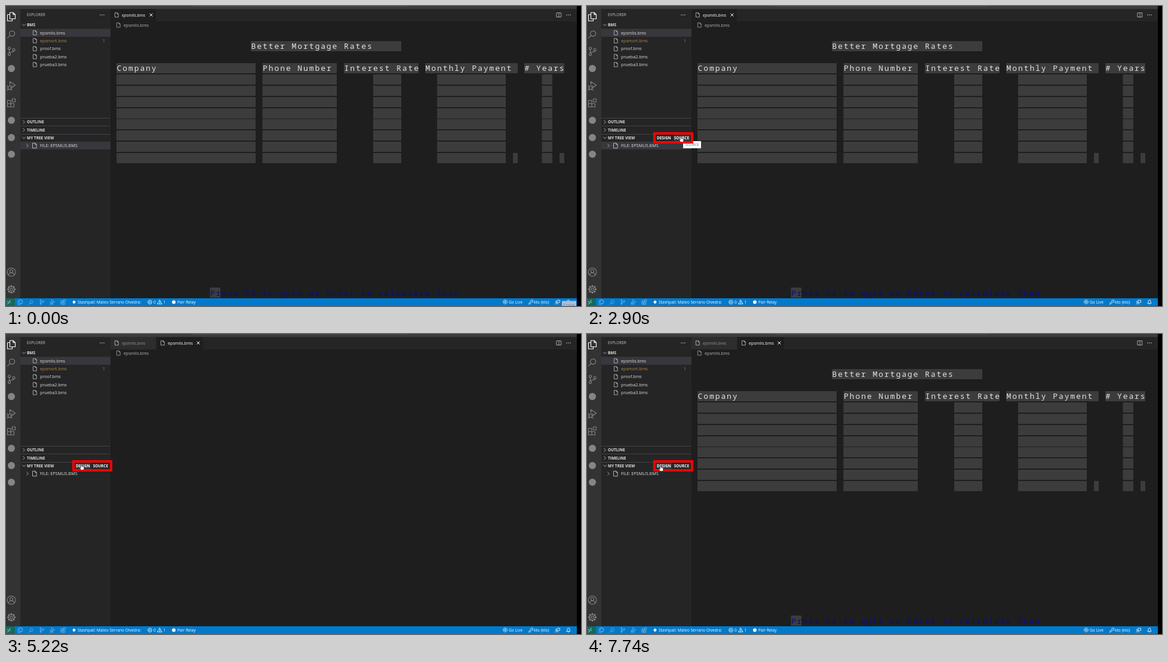
Write an HTML page that moves like this. It is 963 by 504 pixels and loops after 8000 ms.

```html
<!DOCTYPE html>
<html lang="en">
<head>
<meta charset="utf-8">
<title>Map preview</title>
<style>
html, body { margin: 0; width: 100%; height: 100%; overflow: hidden; background: #000; }
svg { display: block; width: 100vw; height: 100vh; }
text { font-family: "Open Sans", "Noto Sans", sans-serif; white-space: pre; }
.mono { font-family: "Noto Sans Mono", monospace; font-size: 13px; letter-spacing: 1.92px; }
.line { fill: none; stroke-linejoin: round; stroke-linecap: round; }
</style>
</head>
<body>
<svg id="stage" viewBox="0 0 963 504" preserveAspectRatio="none"></svg>
<script>
const LOOP = 8000;
const stage = document.getElementById("stage");

function add(parent, tag, attrs, content) {
  const node = document.createElementNS("http://www.w3.org/2000/svg", tag);
  for (const key in attrs) node.setAttribute(key, attrs[key]);
  if (content) node.textContent = content;
  parent.appendChild(node);
  return node;
}
const group = (parent = stage) => add(parent, "g", {});
const rect = (g, x, y, width, height, fill, extra) => add(g, "rect", { x, y, width, height, fill, ...extra });
const dot = (g, cx, cy, r, fill) => add(g, "circle", { cx, cy, r, fill });
const label = (g, x, mid, content, fill = "#dedede", size = 7.2, extra) =>
  add(g, "text", { x, y: mid + size * 0.36, fill, "font-size": size, ...extra }, content);
const mono = (g, x, y, content, fill = "#e4e4e4") => add(g, "text", { x, y, fill, class: "mono" }, content);
const icon = (g, x, y, d, stroke = "#c5c5c5", width = 0.8, scale = 1) =>
  add(g, "path", { d, stroke, class: "line", "stroke-width": width / scale, transform: `translate(${x} ${y}) scale(${scale})` });
const show = (node, on) => node.setAttribute("visibility", on ? "visible" : "hidden");
const BOLD = { "font-weight": 700 };
const ITALIC = { "font-style": "italic" };

// Icon outlines are centred on 0,0.
const FILE = "M-2.7-3.7h3.4l2 2v5.4h-5.4zM.7-3.7v2h2";
const CROSS = "M-2.2-2.2l4.4 4.4M2.2-2.2l-4.4 4.4";
const DOWN = "M-2.6-1.3l2.6 2.6 2.6-2.6";
const RIGHT = "M-1.3-2.6l2.6 2.6-2.6 2.6";
const FILES = "M-2.5-7h5.5l3.5 3.5v7h-9zM-2.5-3.5h-4v10.5h8v-3.5M3-7v3.5h3.5";
const SEARCH = "M-2.5 2a4.5 4.5 0 1 1 1 1zM-2.2 2.2L-6.5 7";
const BRANCH = "M-5.5-5a2 2 0 1 0 4 0a2 2 0 1 0-4 0M-5.5 5a2 2 0 1 0 4 0a2 2 0 1 0-4 0M2-2.5a2 2 0 1 0 4 0a2 2 0 1 0-4 0M-3.5-3v6M4-.5c0 3-7.5 1-7.5 3.5";
const DEBUG = "M-2.5-1v-6l9 6-5.5 4M-5.5 1h5v3a2.5 2.5 0 0 1-5 0zM-7 0l1.5 1.5M1 0l-1.5 1.5M-7 4h1.5M-.5 4h1.5M-7 7.5l2-1.5M1 7.5l-2-1.5";
const BLOCKS = "M-6.5-4.5h5.5v5.5h-5.5zM-6.5 1h5.5v5.5h-5.5zM-1 1h5.5v5.5h-5.5zM1.5-7h5v5h-5z";
const PERSON = "M-7 0a7 7 0 1 0 14 0a7 7 0 1 0-14 0M-2.5-1.5a2.5 2.5 0 1 0 5 0a2.5 2.5 0 1 0-5 0M-4.5 5c1-5 8-5 9 0";
const BELL = "M-3 2h6l-1-1.5v-2a2 2 0 0 0-4 0v2zM-.7 3.3h1.4";

// Frame of the window
rect(stage, 0, 0, 956, 504, "#1e1e1e");
rect(stage, 0, 0, 956, 5, "#3c3c3c");
rect(stage, 313, 0, 359, 1, "#4a4a4a");
rect(stage, 0, 5, 24, 486, "#333");
rect(stage, 24, 5, 151, 486, "#252526");
rect(stage, 175, 5, 781, 21, "#252526");

// Activity bar
const ACTIVITY = [[18, FILES, "#fff"], [47, SEARCH], [76, BRANCH], [134, DEBUG], [163, BLOCKS], [447, PERSON]];
for (const [y, d, colour = "#858585"] of ACTIVITY) icon(stage, 9, y, d, colour, 1.1);
for (const y of [105, 192, 221, 249]) dot(stage, 9, y, 6, "#858585");
icon(stage, 9, 476, "M-2.2 0a2.2 2.2 0 1 0 4.4 0a2.2 2.2 0 1 0-4.4 0M-5 0a5 5 0 1 0 10 0a5 5 0 1 0-10 0", "#858585", 1.2);
for (let k = 0; k < 8; k++) {
  rect(stage, 7.8, 469, 2.4, 2.6, "#858585", { transform: `rotate(${k * 45} 9 476)` });
}

// Explorer
label(stage, 35, 15, "EXPLORER", "#c4c4c4", 6.4);
const dots = x => [-3, 0, 3].forEach(dx => dot(stage, x + dx, 15, 0.8, "#c5c5c5"));
dots(161);
icon(stage, 30, 32, DOWN);
label(stage, 35, 32, "BMS", "#dedede", 6.5, BOLD);
const idleRow = rect(stage, 24, 38.4, 151, 13.3, "#37373d");
const focusRow = rect(stage, 24, 38.8, 150.5, 12.8, "#04395e", { stroke: "#007fd4", "stroke-width": 0.8 });
["epsmlis", "epsmort", "proof", "prueba2", "prueba3"].forEach((name, k) => {
  const y = 45 + k * 13.35;
  icon(stage, 48.5, y, FILE);
  label(stage, 57, y, name + ".bms", k === 1 ? "#b08a48" : "#dedede");
});
label(stage, 162, 58.3, "1", "#b08a48", 6.5);

const folderTools = group();
icon(folderTools, 123, 32, FILE + "M1 3h4M3 1v4");
icon(folderTools, 138, 32, "M-4.2-3h3l1 1h4.4v5.2h-8.4zM1.5 3h4M3.5 1v4");
icon(folderTools, 152, 32, "M3-2.4a3.7 3.7 0 1 0 .8 2.2M3.3-4v2h-2");
icon(folderTools, 166, 32, "M-3.7-1.5h5.4v5.4h-5.4zM-1.7-1.7v-2h5.4v5.4h-2M-2.2 1.2h2.4");

for (const y of [188, 201, 215]) rect(stage, 24, y, 151, 1, "#434345");
[["OUTLINE", 195, RIGHT], ["TIMELINE", 208.3, RIGHT], ["MY TREE VIEW", 221.5, DOWN]].forEach(([name, y, d]) => {
  icon(stage, 30, y, d);
  label(stage, 35, y, name, "#dedede", 6.5, BOLD);
});
const treeHighlight = rect(stage, 24, 228, 151, 13, "#37373d");
const treeRow = group();
icon(treeRow, 36, 234.6, RIGHT);
icon(treeRow, 48, 234.6, FILE, "#c5c5c5", 0.9, 1.15);
label(treeRow, 57, 234.6, "FILE: EPSMLIS.BMS");

// Tabs and breadcrumb
const firstTab = rect(stage, 175, 5, 76, 21, "#1e1e1e");
icon(stage, 185.5, 15, FILE);
const firstName = label(stage, 194, 15, "epsmlis.bms", "#fff", 7.2, ITALIC);
const firstClose = icon(stage, 243, 15, CROSS, "#fff", 1);
const secondTab = group();
const secondBack = rect(secondTab, 252, 5, 78, 21, "#1e1e1e");
icon(secondTab, 262.5, 15, FILE);
const secondName = label(secondTab, 271, 15, "epsmlis.bms", "#fff");
const secondClose = icon(secondTab, 322, 15, CROSS, "#fff", 1);
icon(stage, 926, 15, "M-3.7-3.5h7.4v7h-7.4zM0-3.5v7");
dots(942);
icon(stage, 188.5, 32, FILE, "#a0a6b0");
label(stage, 197, 32.3, "epsmlis.bms", "#b2b7c0");

// Screen map
const design = group();
const BOX = "#3c3c3c";
const rowY = k => Math.round(58.5 + 18.85 * k);
const field = (x, right, k) => rect(design, x, rowY(k), right - x, 17, BOX);
field(410, 662, 0);
mono(design, 410.5, 72, "Better Mortgage Rates");
const COLUMNS = [
  ["Company", 185, 418, 185, 418],
  ["Phone Number", 429.5, 554, 429.5, 554],
  ["Interest Rate", 566, 691, 615, 662],
  ["Monthly Payment", 702, 857, 722, 837],
  ["# Years", 868, 935, 897.5, 915]
];
for (const [name, x, right, cellX, cellRight] of COLUMNS) {
  field(x, right, 2);
  mono(design, x + 0.5, 109.2, name);
  for (let k = 3; k <= 10; k++) field(cellX, cellRight, k);
}
field(849, 857, 10);
field(927, 935, 10);
field(341.5, 359, 22);
mono(design, 342, 487, "Press F3 to quit or Enter to calculate loan", "#0a0a8c");

// Status bar
rect(stage, 0, 491, 956, 13, "#007acc");
rect(stage, 0, 491, 15, 13, "#16695c");
icon(stage, 5, 497.5, "M-2.5-1l2.2 2.2-2.2 2.2M2.5-3.3l-2.2 2.2 2.2 2.2", "#fff");
[FILES, SEARCH, BRANCH, DEBUG, BLOCKS].forEach((d, k) => icon(stage, 24 + 18 * k, 497.5, d, "#78b8e3", 0.8, 0.57));
const status = (x, content) => label(stage, x, 497.6, content, "#fff", 6.7);
dot(stage, 114, 497.5, 2.4, "#fff");
status(120, "Stashpail: Mateo Serrano Olvedra:");
icon(stage, 241, 497.5, "M-3.3 0a3.3 3.3 0 1 0 6.6 0a3.3 3.3 0 1 0-6.6 0M-1.3-1.3l2.6 2.6M1.3-1.3l-2.6 2.6", "#fff");
status(247, "0");
icon(stage, 257.5, 497.5, "M0-3.5l3.6 6.6h-7.2zM0-1v2M0 2v.2", "#fff");
status(263.5, "1");
dot(stage, 281, 497.5, 3, "#fff");
status(287, "Pair Relay");
icon(stage, 836, 497.5, "M-2 2.5a3.4 3.4 0 1 1 4 0M-1 .8a1.4 1.4 0 1 1 2 0M0 0v3.5", "#fff");
status(842, "Go Live");
icon(stage, 879, 497.5, "M0-1.5a1.8 1.8 0 1 1 1.5 1.5L-3 4v-2z", "#fff");
status(884, "kto (kto)");
icon(stage, 924, 497.5, "M-1-3.3h4.5v3.8h-2l-1.3 1.3v-1.3M-3.3-.5a1.4 1.4 0 1 0 2.8 0a1.4 1.4 0 1 0-2.8 0M-4 3.7c0-3 4.2-3 4.2 0", "#fff");
icon(stage, 942, 497.5, BELL, "#fff");
const cornerTip = group();
rect(cornerTip, 931, 495.5, 24, 9, "#a9bfd6");
label(cornerTip, 933.5, 502, "Copia", "#5c86b3", 7);

// View actions; the red outline lies above the tooltip.
const actions = group();
const hover = rect(actions, 145, 216, 28, 11.5, "#333538");
label(actions, 117, 221.7, "DESIGN", "#fff", 6.4, BOLD);
label(actions, 145.7, 221.7, "SOURCE", "#fff", 6.4, BOLD);
const tooltip = group();
rect(tooltip, 161, 227, 30, 12, "#fff");
label(tooltip, 164.5, 233, "SOURCE", "#666", 6);
const redBox = rect(stage, 113, 214, 63, 15, "none", { stroke: "#f00", "stroke-width": 4 });

// Pointer
const click = dot(stage, 0, 0, 5.5, "#e0cf00");
click.setAttribute("opacity", 0.8);
const pointer = group();
const arrow = add(pointer, "path", { d: "M0 0v8.6l2-1.8 1.4 3 1.5-.7-1.4-2.9h2.7z", fill: "#fff", stroke: "#000", "stroke-width": 0.5 });
const hand = add(pointer, "path", {
  d: "M-.8 0q.8-.8 1.6 0v3.2l3.4.9q.7.3.6 1.1l-.6 4.3h-4.5l-2.4-3.6q.2-1 1.9.2z",
  fill: "#fff", stroke: "#000", "stroke-width": 0.5
});

// [time, x, y] of the pointer tip
const PATH = [
  [0, 944, 503], [100, 880, 455], [400, 320, 212], [500, 250, 240], [650, 189, 326], [890, 281, 329],
  [990, 283, 345], [1390, 75, 250], [1710, 126, 219], [2010, 128, 219], [2410, 157, 219],
  [4000, 157, 219], [4300, 208, 168], [4800, 126, 219], [5920, 126, 219], [6320, 157, 221],
  [7030, 157, 221], [7230, 205, 168], [7330, 123, 221], [LOOP, 123, 221]
];
// [start, view, tab count]
const VIEWS = [
  [0, "design", 1], [3410, "loading", 1], [3510, "source", 1], [5120, "loading", 2],
  [5330, "design", 2], [6520, "source", 2], [7630, "loading", 2], [7740, "design", 2]
];
const CLICKS = [3310, 5020, 6420, 7530];

function pointerAt(t) {
  const k = PATH.findIndex(p => p[0] > t);
  const [t0, x0, y0] = PATH[k - 1], [t1, x1, y1] = PATH[k];
  const u = (t - t0) / (t1 - t0);
  return [x0 + (x1 - x0) * u, y0 + (y1 - y0) * u];
}

function styleTab(back, name, close, active) {
  back.setAttribute("fill", active ? "#1e1e1e" : "#2d2d2d");
  name.setAttribute("fill", active ? "#fff" : "#929292");
  show(close, active);
}

function draw(t) {
  const between = (from, to) => t >= from && t < to;
  const [, view, tabs] = VIEWS.findLast(v => v[0] <= t);
  show(design, view === "design");

  const firstActive = tabs === 1 || view === "source";
  styleTab(firstTab, firstName, firstClose, firstActive);
  show(secondTab, tabs === 2);
  styleTab(secondBack, secondName, secondClose, !firstActive);
  show(secondClose, tabs === 2 && !firstActive);

  const focused = between(3410, 3510);
  show(focusRow, focused);
  show(idleRow, !focused);
  show(folderTools, focused);
  show(treeHighlight, t < 3510);
  show(treeRow, !between(3510, 3700));
  show(cornerTip, t < 100);
  show(tooltip, between(2900, 3310));
  show(actions, t >= 1390);
  show(redBox, t >= 1710);

  const tick = Math.floor((t + 10) / 100) * 100 - 10;
  const [x, y] = pointerAt(Math.max(0, tick));
  const onAction = x > 113 && x < 178 && y > 213 && y < 231;
  pointer.setAttribute("transform", `translate(${x} ${y})`);
  show(arrow, t >= 100 && !onAction);
  show(hand, t >= 100 && onAction);
  show(hover, t >= 1390 && onAction);
  hover.setAttribute("x", x < 143 ? 116 : 145);
  hover.setAttribute("width", x < 143 ? 26 : 28);

  click.setAttribute("cx", x);
  click.setAttribute("cy", y + 1.5);
  show(click, CLICKS.some(c => between(c, c + 100)));
}

const start = performance.now();
function frame() {
  draw((performance.now() - start) % LOOP);
  requestAnimationFrame(frame);
}
frame();
</script>
</body>
</html>
```
